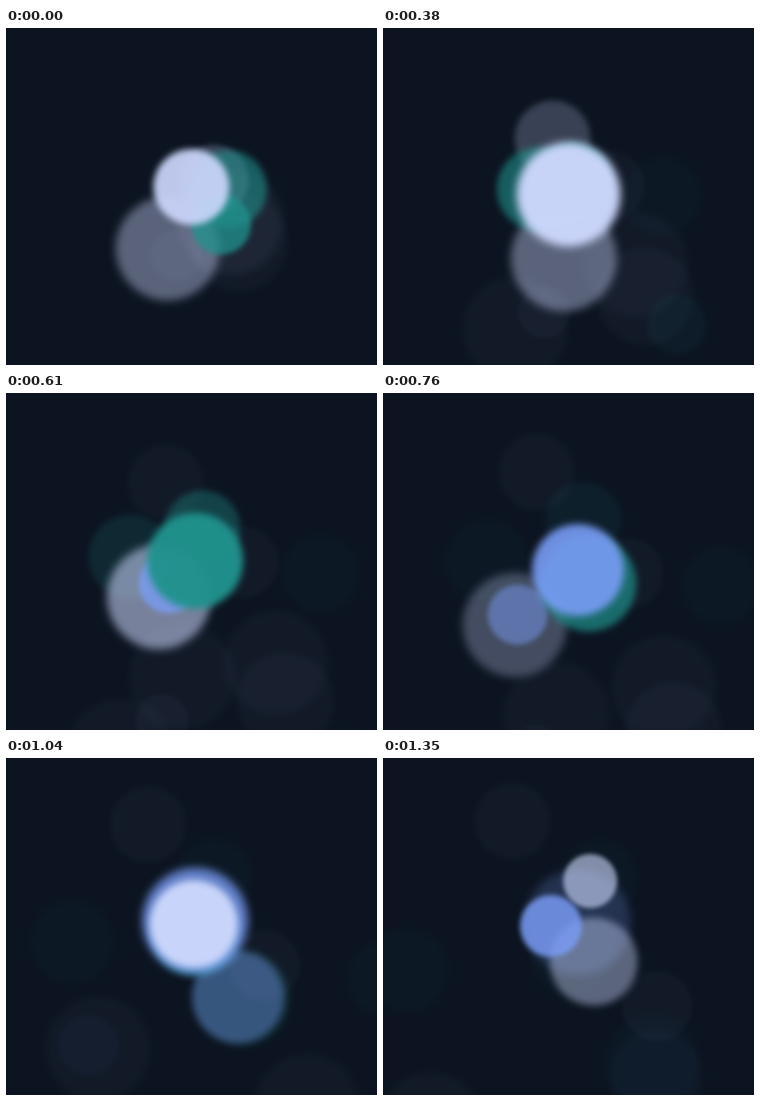
These frames come from a looping animation (371x337 px, 1.4 s). An HTML page:

```html
<!DOCTYPE html>
<html lang="en">
<head>
<meta charset="utf-8">
<title>Drifting orbs</title>
<style>
  html, body { margin: 0; width: 100%; height: 100%; overflow: hidden; background: #0c1421; }
  svg { display: block; width: 100vw; height: 100vh; }
</style>
</head>
<body>
<svg id="stage" viewBox="0 0 371 337"></svg>
<script>
const LOOP = 1400;
const ORIGIN = { x: 187, y: 165 };
const GRAVITY = 5.8e-5;
const FADE = 0.00182;
const REST = 0.03;
const SOFTNESS = 0.08;
const LIGHT = '#cbd6fb', TEAL = '#20928d', BLUE = '#7a9df7';

const stage = document.getElementById('stage');

// The emitter slows down a little once the loop is under way
const birthOf = n => 150 + n * (n < 0 ? 95 : 110);

// Launches in order: colour, radius, velocity in px/ms
const launches = [
  [LIGHT, 52, -0.078, 0.152],
  [TEAL, 39, 0.152, -0.03],
  [TEAL, 30, 0.208, 0.226],
  [LIGHT, 38, -0.0415, -0.154],
  [LIGHT, 53, -0.019, 0.182],
  [TEAL, 42, -0.136, -0.03],
  [TEAL, 38, 0.027, -0.105],
  [LIGHT, 52, -0.142, 0.149],
  [BLUE, 30, -0.187, 0.186],
  [TEAL, 48, 0.108, 0.14],
  [BLUE, 46, 0.132, 0.198],
  [TEAL, 44, 0.008, 0.025],
  [BLUE, 53, 0.018, -0.026],
  [LIGHT, 44, 0.074, 0.102],
  [LIGHT, 27, 0.096, -0.212],
  [BLUE, 31, -0.19, 0.025]
];

function seeded(seed) {
  return () => (seed = (seed * 16807) % 2147483647) / 2147483647;
}

// Orbs launched long before the loop begins are only a dim haze
const random = seeded(41);
const between = (low, high) => low + (high - low) * random();
const older = Array.from({ length: 4 }, () =>
  [LIGHT, between(26, 54), between(-0.11, 0.11), between(-0.1, 0.05)]);

const orbs = [...older, ...launches].map(([colour, r, vx, vy], i) => {
  const node = document.createElementNS('http://www.w3.org/2000/svg', 'circle');
  node.setAttribute('r', r);
  node.setAttribute('fill', colour);
  node.style.filter = `blur(${r * SOFTNESS}px)`;
  stage.appendChild(node);
  return { node, vx, vy, birth: birthOf(i - older.length - 5) };
});

function draw(t) {
  for (const { node, vx, vy, birth } of orbs) {
    const age = t - birth;
    const alpha = age < 0 ? 0 : Math.max(REST, 1 - FADE * age);
    node.setAttribute('cx', ORIGIN.x + vx * age);
    node.setAttribute('cy', ORIGIN.y + vy * age + GRAVITY * age * age);
    node.setAttribute('opacity', alpha);
  }
}

// Time advances in beats: one of 30 ms, then four of 50 ms
function step(t) {
  const beat = (t + 110) % 230;
  const held = beat < 30 ? beat : (beat - 30) % 50;
  return Math.max(0, t - held);
}

const begin = performance.now();
function frame() {
  draw(step((performance.now() - begin) % LOOP));
  requestAnimationFrame(frame);
}
frame();
</script>
</body>
</html>
```
